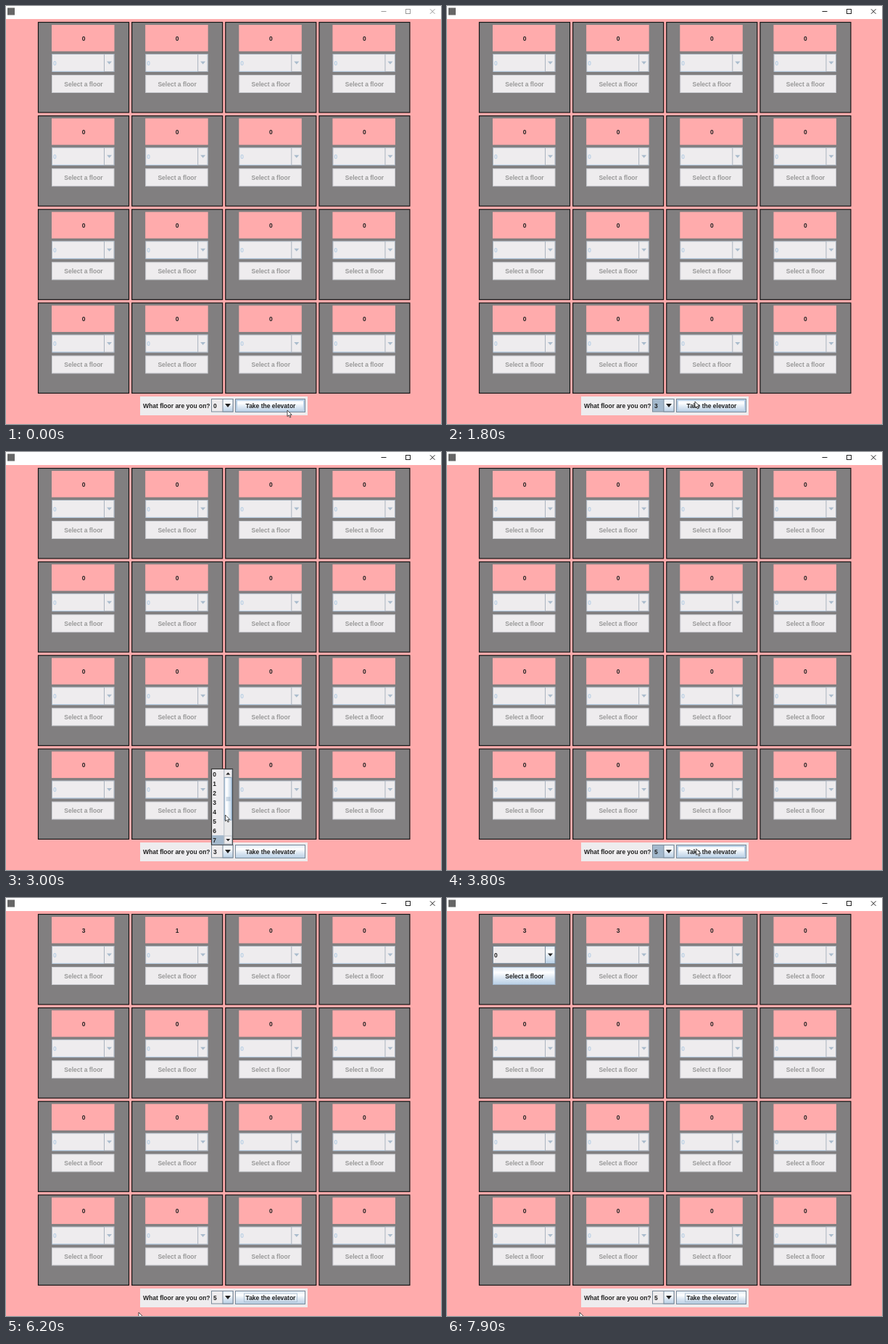
An HTML page that plays this animation: 600x577 px, repeating every 8 s.

```html
<!DOCTYPE html>
<html lang="en">
<head>
<meta charset="utf-8">
<title>Elevators</title>
<style>
html, body { margin: 0; width: 100%; height: 100%; overflow: hidden; background: #ffabac; }
svg { display: block; width: 600px; height: 577px; }
text { font: bold 8.5px "Liberation Sans", Arial, sans-serif; fill: #222; white-space: pre; }
</style>
</head>
<body>
<svg id="stage" viewBox="0 0 600 577">
  <defs>
    <linearGradient id="ocean" x1="0" y1="0" x2="0" y2="1">
      <stop offset="0" stop-color="#dde8f3"/>
      <stop offset=".3" stop-color="#fff"/>
      <stop offset=".6" stop-color="#dde8f3"/>
      <stop offset="1" stop-color="#b8cfe5"/>
    </linearGradient>
    <linearGradient id="thumb">
      <stop offset="0" stop-color="#e6eef7"/>
      <stop offset=".35" stop-color="#fff"/>
      <stop offset="1" stop-color="#b8cfe5"/>
    </linearGradient>
  </defs>
  <g id="scene"></g>
  <path id="cursor" d="M0 0V8.6L2 6.8L3.5 10L4.9 9.4L3.5 6.3H6.2Z" fill="#fff" stroke="#222" stroke-width=".8"/>
</svg>
<script>
const LOOP = 8000, STEP = 100;
const PINK = '#ffabac', FACE = '#eeecee', EDGE = '#7a8a99', SELECTED = '#a3b8cc', OCEAN = 'url(#ocean)';
const scene = document.getElementById('scene');
const cursor = document.getElementById('cursor');

// [time, x, y] of the pointer tip
const pointerPath = [
  [0, 388, 558], [100, 386, 558], [500, 297, 550], [800, 295.5, 545.5], [900, 295, 540],
  [1200, 291, 487], [1400, 291, 485], [1700, 335, 545], [1800, 342, 546], [2100, 345, 549],
  [2500, 305, 551], [2700, 304, 548], [3000, 302.5, 501], [3200, 293, 511], [3400, 291, 511],
  [3700, 343, 547], [4000, 346, 550], [4500, 183, 572], [LOOP, 183, 572]
];

// Value of the last [time, value] entry reached
const at = (steps, t) => steps.reduce((value, [start, next]) => t >= start ? next : value, steps[0][1]);

const between = (t, from, to) => t >= from && t < to;

function pointerAt(t) {
  const i = Math.max(1, pointerPath.findIndex(p => p[0] >= t));
  const [t0, x0, y0] = pointerPath[i - 1], [t1, x1, y1] = pointerPath[i];
  const k = (t - t0) / (t1 - t0), e = k * k * (3 - 2 * k);
  return [x0 + (x1 - x0) * e, y0 + (y1 - y0) * e];
}

const rect = (x, y, w, h, fill, stroke = 'none', sw = 1) =>
  `<rect x="${x}" y="${y}" width="${w}" height="${h}" fill="${fill}" stroke="${stroke}" stroke-width="${sw}"/>`;
const label = (x, y, s, anchor = 'start', fill = '#222') =>
  `<text x="${x}" y="${y}" text-anchor="${anchor}" style="fill:${fill}">${s}</text>`;
const triangle = (x, y, w, h, fill) =>
  `<path d="M${x - w / 2} ${y}h${w}l${-w / 2} ${h}z" fill="${fill}"/>`;
const line = (d, color, width = 1) =>
  `<path d="${d}" fill="none" stroke="${color}" stroke-width="${width}"/>`;

function titleBar(active) {
  const ink = active ? '#222' : '#999';
  return rect(0, 0, 600, 18, '#fff') + rect(2, 2.5, 10, 10, '#666') +
    line('M517.5 7.5h7', ink) + rect(551.5, 4.5, 6, 6, 'none', ink) +
    line('M585 4.3l6.5 6.5m0-6.5l-6.5 6.5', ink);
}

function car(index, floor, enabled) {
  const x = 44 + index % 4 * 129.15, y = 22 + Math.floor(index / 4) * 129.15;
  const edge = enabled ? EDGE : '#aab4bf';
  const fill = enabled ? OCEAN : FACE;
  return `<g transform="translate(${x} ${y})">` +
    rect(.5, .5, 125, 124.5, '#817f80', '#151515', 1.2) +
    rect(19, 4, 86.5, 36.5, PINK) + label(63, 25.7, floor, 'middle') +
    rect(19.5, 44.5, 85.5, 24, FACE, edge) +
    rect(91.5, 44.5, 13.5, 24, fill, edge) +
    line('M20 68.3h71', enabled ? EDGE : '#b8cfe5') +
    label(21, 59.6, 0, 'start', enabled ? '#222' : '#b8cfe5') +
    triangle(98.5, 54.5, 7, 4, enabled ? '#222' : '#aabccd') +
    rect(19.5, 73.5, 85.5, 24, fill, enabled ? '#9fb3c8' : '#c9cbd0') +
    label(63, 88.5, 'Select a floor', 'middle', enabled ? '#222' : '#999') + '</g>';
}

function controls(floor, s) {
  return rect(185, 539, 231, 26, FACE) +
    label(189, 555.3, 'What floor are you on?') +
    rect(283.5, 542.5, 29.5, 17.5, s.comboFocus ? SELECTED : FACE, EDGE) +
    rect(299, 542.5, 14, 17.5, OCEAN, EDGE) +
    label(286, 554.6, floor) + triangle(306, 549, 8, 5, '#222') +
    rect(316.5, 542.5, 96, 18, s.pressed ? '#b8cfe5' : OCEAN, EDGE) +
    (s.hover ? rect(318, 544, 93, 15, 'none', '#b8cfe5', 2) : '') +
    (s.buttonFocus ? rect(328.5, 546, 73, 11.5, 'none', '#a3b8cc', .8) : '') +
    label(365, 555.3, 'Take the elevator', 'middle');
}

function popup(selected) {
  let out = rect(283.5, 437.5, 29, 104.5, FACE, '#333', 1.2);
  for (let i = 0; i < 8; i++) {
    const y = 438.5 + i * 12.95;
    if (i === selected) out += rect(284.2, y, 16.3, 12.6, SELECTED);
    out += label(285.2, y + 9.4, i);
  }
  return out + rect(300.8, 438.5, 11, 103, '#e9e9eb', '#aab4bf', .8) +
    rect(301.2, 449.5, 10.2, 58.5, 'url(#thumb)', '#7f9db9', .9) +
    line('M303.5 477h6m-6 2h6m-6 2h6', '#8fa9c3', .8) +
    rect(301, 438.5, 10.5, 10.5, FACE, '#aab4bf', .8) + triangle(306.3, 445.5, 6, -3.2, '#222') +
    rect(301, 530, 10.5, 11, FACE, '#aab4bf', .8) + triangle(306.3, 534, 6, 3.2, '#222');
}

function draw(t) {
  const [px, py] = pointerAt(t);
  const floors = [
    at([[0, 0], [4100, 1], [5100, 2], [6100, 3]], t),
    at([[0, 0], [5900, 1], [6900, 2], [7800, 3]], t)
  ];
  let out = rect(0, 0, 600, 577, PINK) + titleBar(t >= 100);
  for (let i = 0; i < 16; i++) out += car(i, floors[i] || 0, i === 0 && t >= 7100);
  out += controls(at([[0, 0], [1400, 3], [3400, 5]], t), {
    comboFocus: between(t, 1400, 2000) || between(t, 3400, 3900),
    buttonFocus: between(t, 2000, 2600) || t >= 3900,
    pressed: between(t, 2000, 2100) || between(t, 3900, 4000),
    hover: px > 316 && px < 413 && py > 542 && py < 561
  });
  if (between(t, 600, 1400) || between(t, 2600, 3400)) {
    const row = Math.floor((py - 438.5) / 12.95);
    const chosen = t < 1400
      ? (t < 1000 ? 0 : Math.min(7, row))
      : at([[2600, 3], [2800, 7], [3200, 5]], t);
    out += popup(chosen);
  }
  scene.innerHTML = out;
  cursor.setAttribute('transform', `translate(${px} ${py})`);
}

let start = null, shown = -1;
function tick(now) {
  if (start === null) start = now;
  const t = Math.floor(Math.max(0, now - start) % LOOP / STEP) * STEP;
  if (t !== shown) draw(shown = t);
  requestAnimationFrame(tick);
}
draw(0);
requestAnimationFrame(tick);
</script>
</body>
</html>
```
